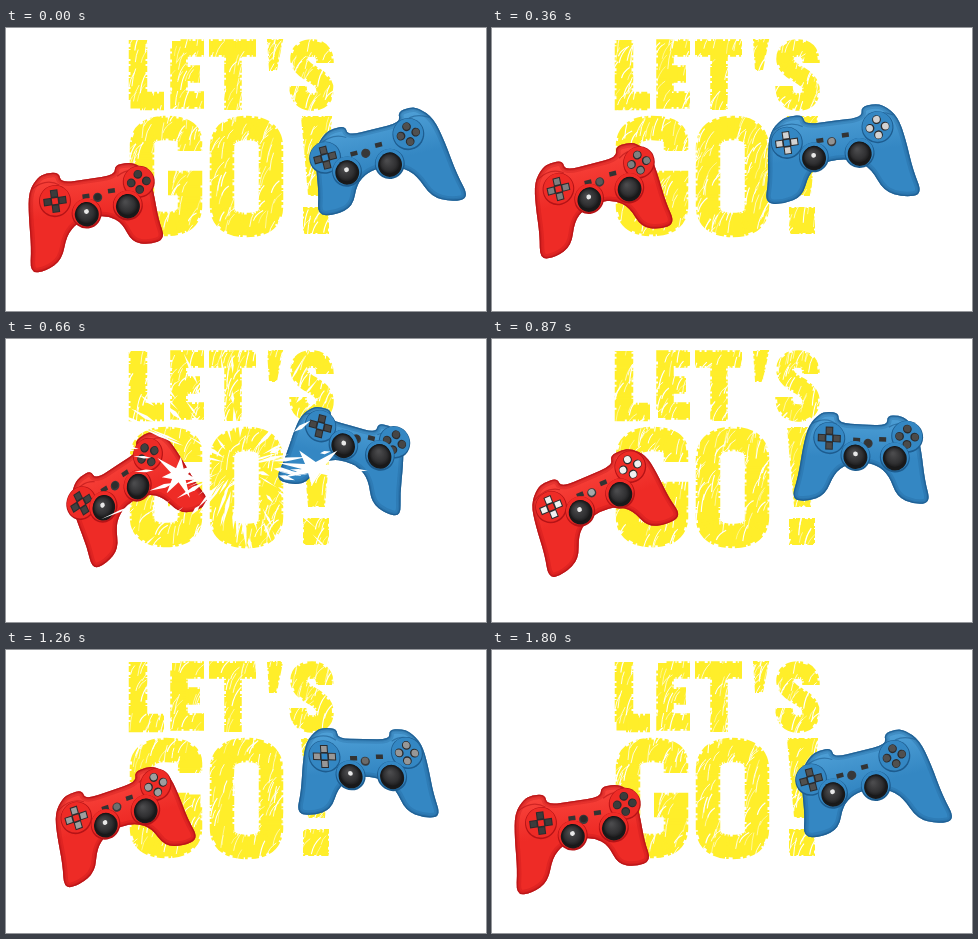
Animation of 480 by 283 pixels, one loop 1830 ms. Source, as an HTML page with a canvas:

```html
<!DOCTYPE html>
<html lang="en">
<head>
<meta charset="utf-8">
<title>Let's go!</title>
<style>
html, body { margin: 0; width: 100%; height: 100%; overflow: hidden; background: #fff; }
canvas { display: block; }
</style>
</head>
<body>
<canvas id="stage" width="480" height="283" role="img" aria-label="LET'S GO!"></canvas>
<script>
const ctx = document.getElementById('stage').getContext('2d');
const LOOP = 1830, STEP = 30, HIT = 570, TAU = Math.PI * 2;

// Pose: left shoulder, right shoulder, left grip, right grip, face shift (x, y), key brightness
const RED = {
  dir: -1, light: '#f8433b', base: '#ee2b26', dark: '#b51316',
  poses: [
    [40,148, 122,137, 38,240, 145,213, 7,2, 60],
    [22,147, 104,132, 20,238, 132,208, 7,3, 62],
    [96,128, 170,102, 105,214, 207,187, 0,0, 195],
    [75,140, 140,97, 98,222, 191,168, -17,8, 65],
    [55,146, 133,113, 72,232, 177,182, -6,2, 240],
    [70,146, 147,128, 67,233, 175,205, 4,0, 65]
  ]
};
const BLUE = {
  dir: 1, light: '#4e9fd6', base: '#3487c3', dark: '#1d5c8f',
  poses: [
    [327,103, 405,82, 327,184, 447,170, -22,10, 80],
    [330,93, 417,73, 327,177, 457,165, -15,9, 215],
    [263,88, 348,84, 250,169, 369,166, -5,0, 205],
    [314,70, 383,89, 283,142, 382,172, 7,-6, 70],
    [333,75, 405,79, 312,159, 422,162, 5,2, 75],
    [305,88, 388,84, 302,168, 421,168, -13,12, 220]
  ]
};
// Time, pose, outward push
const KEYS = [[0,0,0], [130,1,8], [210,1,0], [510,2,0], [HIT,2,-11],
  [660,3,0], [870,4,2], [1080,4,0], [1470,5,0], [1800,0,0]];

// Left half of the body outline, from the top middle to the bottom middle
const HALF = [[.5,.1], [.18,.1], [.16,-.02], [0,-.03], [-.1,0], [-.2,.14], [-.18,.4],
  [-.13,.75], [-.13,1.02], [.02,1.04], [.17,.96], [.22,.7], [.34,.58], [.5,.55]];
const OUTLINE = [...HALF, ...HALF.slice(1, -1).reverse().map(([u, v]) => [1 - u, v])];

const STROKES = [
  [17, 'M132 12V73H158'],
  [16, 'M198 20H173V72H198M173 46H194'],
  [16, 'M203 20H250M227 20V82'],
  [16, 'M319 35Q319 20 306 20Q293 20 293 31Q293 39 306 46Q319 53 319 62Q319 74 306 74Q292 74 292 58'],
  [23, 'M184 123V113Q184 100 160 100Q136 100 136 118V178Q136 196 160 196Q184 196 184 178V155H162'],
  [23, 'M241 100Q265 100 265 120V178Q265 197 241 197Q216 197 216 178V120Q216 100 241 100Z']
].map(([w, d]) => [w, new Path2D(d)]);
const SOLIDS = new Path2D('M262 12H276L270 42H264ZM296 89H325L318 167H303ZM298 180H322V205H298Z');

function random(seed) {
  return () => {
    seed = (seed * 1664525 + 1013904223) >>> 0;
    return seed / 4294967296;
  };
}

function poseAt({ poses, dir }, t) {
  const last = KEYS.length - 1;
  let i = 0;
  while (i < last - 1 && KEYS[i + 1][0] <= t) i++;
  const t0 = KEYS[i][0], span = KEYS[i + 1][0] - t0, s = (t - t0) / span;
  return poses[0].map((_, c) => {
    const val = j => poses[KEYS[j][1]][c] + (c < 8 && c % 2 == 0 ? dir * KEYS[j][2] : 0);
    const a = val(i), b = val(i + 1);
    const slope = j => {
      if (KEYS[j][0] == HIT) return (b - a) / span;
      if (j == 0 || j == last)
        return (val(1) - val(last - 1)) / (KEYS[1][0] + KEYS[last][0] - KEYS[last - 1][0]);
      return (val(j + 1) - val(j - 1)) / (KEYS[j + 1][0] - KEYS[j - 1][0]);
    };
    const r = 1 - s;
    return a * r * r * (1 + 2 * s) + b * s * s * (3 - 2 * s)
      + span * s * r * (slope(i) * r - slope(i + 1) * s);
  });
}

function disc(x, y, r, fill) {
  ctx.fillStyle = fill;
  ctx.beginPath();
  ctx.arc(x, y, r, 0, TAU);
  ctx.fill();
}

function drawText(seed) {
  const rnd = random(seed * 977 + 31);
  ctx.strokeStyle = ctx.fillStyle = '#ffee2a';
  for (const [w, path] of STROKES) {
    ctx.setLineDash([]);
    ctx.lineWidth = w - 2;
    ctx.stroke(path);
    ctx.setLineDash([3, 2, 6, 3, 2, 1, 9, 2]);
    ctx.lineDashOffset = rnd() * 28;
    ctx.lineWidth = w + 1.5;
    ctx.stroke(path);
  }
  ctx.fill(SOLIDS);
  ctx.lineWidth = 2;
  ctx.stroke(SOLIDS);
  ctx.setLineDash([]);

  // Pen scratches
  ctx.strokeStyle = '#fff';
  for (let i = 0; i < 330; i++) {
    const x = 120 + rnd() * 210, y = 8 + rnd() * 204;
    const dx = 2 + rnd() * 8, dy = -8 - rnd() * 12;
    ctx.lineWidth = .4 + rnd() * .8;
    ctx.beginPath();
    ctx.moveTo(x, y);
    ctx.quadraticCurveTo(x + dx * .2, y + dy * .6, x + dx, y + dy);
    ctx.stroke();
  }
}

function drawPad(pad, t) {
  const p = poseAt(pad, t);
  const at = (u, v, k = 0) => [0, 1].map(c =>
    (p[c] * (1 - u) + p[2 + c] * u) * (1 - v) + (p[4 + c] * (1 - u) + p[6 + c] * u) * v + p[8 + c] * k);
  const unit = (a, b) => {
    const x = b[0] - a[0], y = b[1] - a[1], n = Math.hypot(x, y);
    return [x / n, y / n];
  };
  const ex = unit(at(0, 0), at(1, 0)), ey = unit(at(.5, 0), at(.5, 1));
  const local = (u, v, k, draw) => {
    ctx.save();
    ctx.transform(...ex, ...ey, ...at(u, v, k));
    draw();
    ctx.restore();
  };

  // Body
  const pts = OUTLINE.map(q => at(...q)), body = new Path2D();
  const mid = (a, b) => [(a[0] + b[0]) / 2, (a[1] + b[1]) / 2];
  body.moveTo(...mid(pts[pts.length - 1], pts[0]));
  pts.forEach((q, i) => body.quadraticCurveTo(...q, ...mid(q, pts[(i + 1) % pts.length])));
  body.closePath();
  const fill = ctx.createLinearGradient(...at(.5, 0), ...at(.5, 1));
  fill.addColorStop(0, pad.light);
  fill.addColorStop(.5, pad.base);
  fill.addColorStop(1, pad.base);
  ctx.fillStyle = fill;
  ctx.fill(body);
  ctx.save();
  ctx.clip(body);
  ctx.strokeStyle = pad.dark;
  for (const w of [9, 5, 2.5]) {
    ctx.globalAlpha = w < 3 ? .8 : .25;
    ctx.lineWidth = w;
    ctx.stroke(body);
  }
  ctx.globalAlpha = .6;
  ctx.lineWidth = 1.2;
  ctx.beginPath();
  for (const u of [-.16, .84]) {
    ctx.moveTo(...at(u, .12));
    ctx.quadraticCurveTo(...at(u + .16, .02), ...at(u + .32, .12));
  }
  ctx.stroke();
  ctx.restore();

  const grey = p[10] | 0, keys = `rgb(${grey},${grey},${grey})`;
  const cluster = (u, v, round) => local(u, v, .6, () => {
    disc(0, 0, 16, pad.dark);
    disc(0, -.6, 15, pad.base);
    for (let i = 0; i < 4; i++) {
      ctx.rotate(TAU / 4);
      if (round) {
        disc(0, -7.6, 4.4, '#2b2b2d');
        disc(0, -8, 3.4, keys);
      } else {
        ctx.fillStyle = '#2b2b2d';
        ctx.fillRect(-3.8, -11.5, 7.6, 8.6);
        ctx.fillStyle = keys;
        ctx.fillRect(-2.8, -10.5, 5.6, 6);
      }
    }
  });
  cluster(.06, .27, false);
  cluster(1.02, .21, true);

  local(.55, .31, .7, () => {
    ctx.fillStyle = '#333';
    ctx.fillRect(-17, -5, 7, 4.5);
    ctx.fillRect(9, -7, 7, 4.5);
    disc(-2, 0, 4.6, '#3a3a3c');
    disc(-2, -.5, 3.3, `rgb(${grey * .7},${grey * .7},${grey * .7})`);
  });

  // Sticks
  for (const u of [.37, .81]) local(u, .46, 1, () => {
    disc(0, 0, 15, pad.dark);
    disc(0, -1, 14, pad.base);
    disc(0, 1, 12, '#19191a');
    const top = ctx.createRadialGradient(-2, -4, 1, 0, 0, 11);
    top.addColorStop(0, '#4b4b4d');
    top.addColorStop(.65, '#303032');
    top.addColorStop(1, '#151516');
    disc(0, -1, 10.5, top);
    if (u < .5) disc(0, -2, 2.4, '#e8e8e8');
  });
}

function star(x, y, rx, ry, turn, rnd) {
  ctx.beginPath();
  for (let i = 0; i < 14; i++) {
    const a = turn + i * TAU / 14, r = i % 2 ? .35 : .7 + rnd() * .5;
    ctx.lineTo(x + Math.cos(a) * r * rx, y + Math.sin(a) * r * ry);
  }
  ctx.fill();
}

// White splinters fly out from the point of impact
function drawBurst(t) {
  const age = (t - HIT) / 240;
  if (age < 0 || age >= 1) return;
  const rnd = random(7), size = Math.sin(Math.PI * (.15 + .85 * age));
  ctx.fillStyle = '#fff';
  for (let i = 0; i < 110; i++) {
    const a = rnd() * TAU, c = Math.cos(a), s = Math.sin(a);
    const r = 8 + (.25 + age * 1.6) * rnd() * 125;
    const len = (10 + rnd() * 28) * size, w = (.6 + rnd() * 1.7) * size;
    const x = 232 + c * r, y = 126 + s * r * .9;
    ctx.beginPath();
    ctx.moveTo(x, y);
    ctx.lineTo(x + c * len * .4 - s * w, y + s * len * .4 + c * w);
    ctx.lineTo(x + c * len, y + s * len);
    ctx.lineTo(x + c * len * .4 + s * w, y + s * len * .4 - c * w);
    ctx.fill();
  }
  const spread = 25 + 90 * age;
  star(232 - spread, 136, 25 * size, 21 * size, .3, rnd);
  star(250 + spread, 129, 38 * size, 17 * size, -.15, rnd);
}

function draw(now) {
  const frame = Math.floor(now % LOOP / STEP), t = frame * STEP;
  ctx.fillStyle = '#fff';
  ctx.fillRect(0, 0, 480, 283);
  drawText(Math.floor(frame % 60 / 4));
  drawPad(RED, t);
  drawPad(BLUE, t);
  drawBurst(t);
}

let start;
function tick(now) {
  start ??= now;
  draw(now - start);
  requestAnimationFrame(tick);
}
draw(0);
requestAnimationFrame(tick);
</script>
</body>
</html>
```
